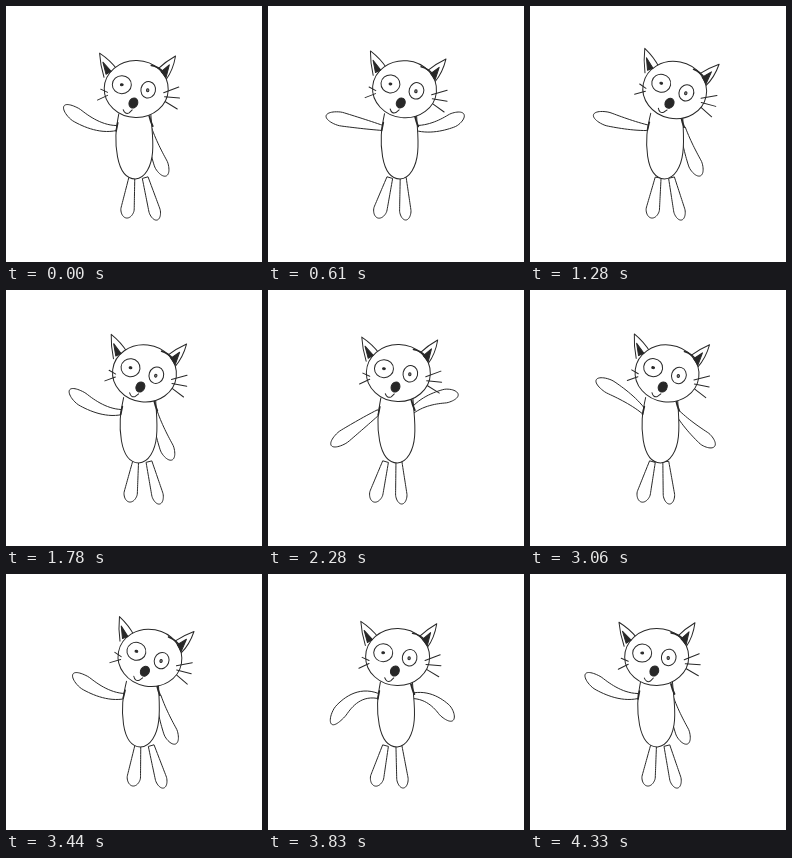
Write an HTML page with a canvas that moves like this. It is 256x256 px and loops after 4.38 s.

```html
<!DOCTYPE html>
<html>
<head>
<meta charset="utf-8">
<title>Dancing cat</title>
<style>
  html, body { margin: 0; width: 100%; height: 100%; overflow: hidden; background: #fff }
  canvas { display: block; width: 256px; height: 256px }
</style>
</head>
<body>
<canvas id="stage" width="256" height="256"></canvas>
<script>
const g = document.getElementById('stage').getContext('2d');
const LOOP = 4380, STEPS = 79, INK = '#282828', TAU = 2 * Math.PI, RAD = Math.PI / 180;

const wave = (phase, peak) => Math.cos(TAU * (phase - peak));
// One bump per cycle, from 0 to 1; a higher power makes it shorter
const pulse = (phase, peak, power) => ((1 + wave(phase, peak)) / 2) ** power;

function path(d, width = 1, fill) {
  const p = new Path2D(d);
  if (fill) { g.fillStyle = fill; g.fill(p); }
  g.lineWidth = width;
  g.stroke(p);
}

function oval(x, y, rx, ry, fill, turn = 0) {
  g.beginPath();
  g.ellipse(x, y, rx, ry, turn, 0, TAU);
  g.fillStyle = fill;
  g.fill();
  g.lineWidth = 1;
  g.stroke();
}

// A tapered, round-ended shape whose centre line runs from a through b to c
function limb(a, b, c, w0, w1) {
  const q = [0, 1].map(i => 2 * b[i] - (a[i] + c[i]) / 2);
  const left = [], right = [];
  for (let i = 0; i <= 28; i++) {
    const t = 1 - (1 - i / 28) ** 2, u = 1 - t;
    const [x, y] = [0, 1].map(k => u * u * a[k] + 2 * u * t * q[k] + t * t * c[k]);
    const [dx, dy] = [0, 1].map(k => u * (q[k] - a[k]) + t * (c[k] - q[k]));
    const end = Math.max(0, (t - .75) / .25), len = Math.hypot(dx, dy) || 1;
    const w = (w0 + (w1 - w0) * Math.min(1, t * 1.25)) * Math.sqrt(1 - end * end) / len;
    left.push([x - dy * w, y + dx * w]);
    right.unshift([x + dy * w, y - dx * w]);
  }
  path('M' + left.concat(right).join('L') + 'Z', 1, '#fff');
}

// Angles are degrees below level; side is -1 for left, 1 for right
function arm(x, y, side, upper, fore, upperLen, foreLen) {
  const reach = ([px, py], deg, r) =>
    [px + side * r * Math.cos(deg * RAD), py + r * Math.sin(deg * RAD)];
  const elbow = reach([x, y], upper, upperLen);
  limb([x, y], elbow, reach(elbow, fore, foreLen), 2.5, 7);
}

function leg(x, dx, foot, width) {
  limb([x, 172], [x + dx * .5, (172 + foot) / 2], [x + dx, foot], 3, width);
}

function turned(x, y, deg, draw) {
  g.save();
  g.translate(x, y);
  g.rotate(deg * RAD);
  g.translate(-129, -y);
  draw();
  g.restore();
}

function body() {
  path('M113 108C110 124 109 135 112 151C115 166 121 173 130 173C140 172 146 160 147 146C148 133 146 122 145 108', 1, '#fff');
  path('M112 117L110.500 125', 1.6);
  path('M143.500 110Q145 116 147 120', 1.8);
}

function head() {
  path('M97 72Q93 60 92 48Q103 55 110 64', 1, '#fff');
  path('M151 62Q158 55 168 49Q166 63 159 73', 1, '#fff');
  oval(129.500, 83, 32, 28.500, '#fff');
  path('M95.500 57L104 66L99 69Z', 1, INK);
  path('M154 65L162 58L159 71Z', 1, INK);
  path('M144 59Q151 60 157 66', 1.6);
  oval(115, 79, 9.500, 9, '#fff');
  oval(141.500, 83.500, 7.3, 8.3, '#fff', .2);
  oval(115, 79, 1.4, 1, INK);
  oval(141, 84, 1.2, 1.5, '#888');
  oval(127, 97, 4.3, 5.2, INK, .4);
  path('M117 104Q119 109 123 107L126 104');
  path('M94 84L101 87M91 95L101 90M157 86L172 80M158 90L173 91M159 95L171 102');
}

function draw(u) {
  // Halfway through, the limbs rush ahead by half a swing while the head lags a little
  const off = Math.min(1, Math.abs(u - .494) / .203);
  const rush = (1 + Math.cos(Math.PI * off)) / 2;
  const limbs = 4 * u + .085 * Math.sin(TAU * u) + .46 * rush;
  const sway = 8 * u - .155 * rush;

  const x = 130.5 + 4.5 * wave(sway, .32), tilt = 5.5 + 6 * wave(sway, .37);
  const hip = 4.2 * wave(limbs, 0), kick = wave(limbs, .08);

  g.fillStyle = '#fff';
  g.fillRect(0, 0, 256, 256);
  g.strokeStyle = INK;
  g.lineJoin = g.lineCap = 'round';
  leg(x - 7 + hip, -8.5 + 3.5 * kick, 212, 6.8);
  leg(x + 6.5 + hip, 7.5 + 5 * kick, 214, 5.8);
  arm(x - 18.5 + tilt * .3, 122, -1,
    -10 + 45 * pulse(limbs, .51, 16) - 32 * pulse(limbs, .73, 12),
    -33 + 83 * pulse(limbs, .44, 4), 25, 33);
  arm(x + 14 + tilt * .35, 122, 1,
    74 - 111 * pulse(limbs, .54, 5),
    67 - 110 * pulse(limbs, .575, 8), 23, 28);
  turned(x, 143, tilt * .25, body);
  turned(x, 130, tilt, head);
}

function tick() {
  draw(Math.floor(performance.now() % LOOP / LOOP * STEPS) / STEPS);
  requestAnimationFrame(tick);
}
tick();
</script>
</body>
</html>
```
